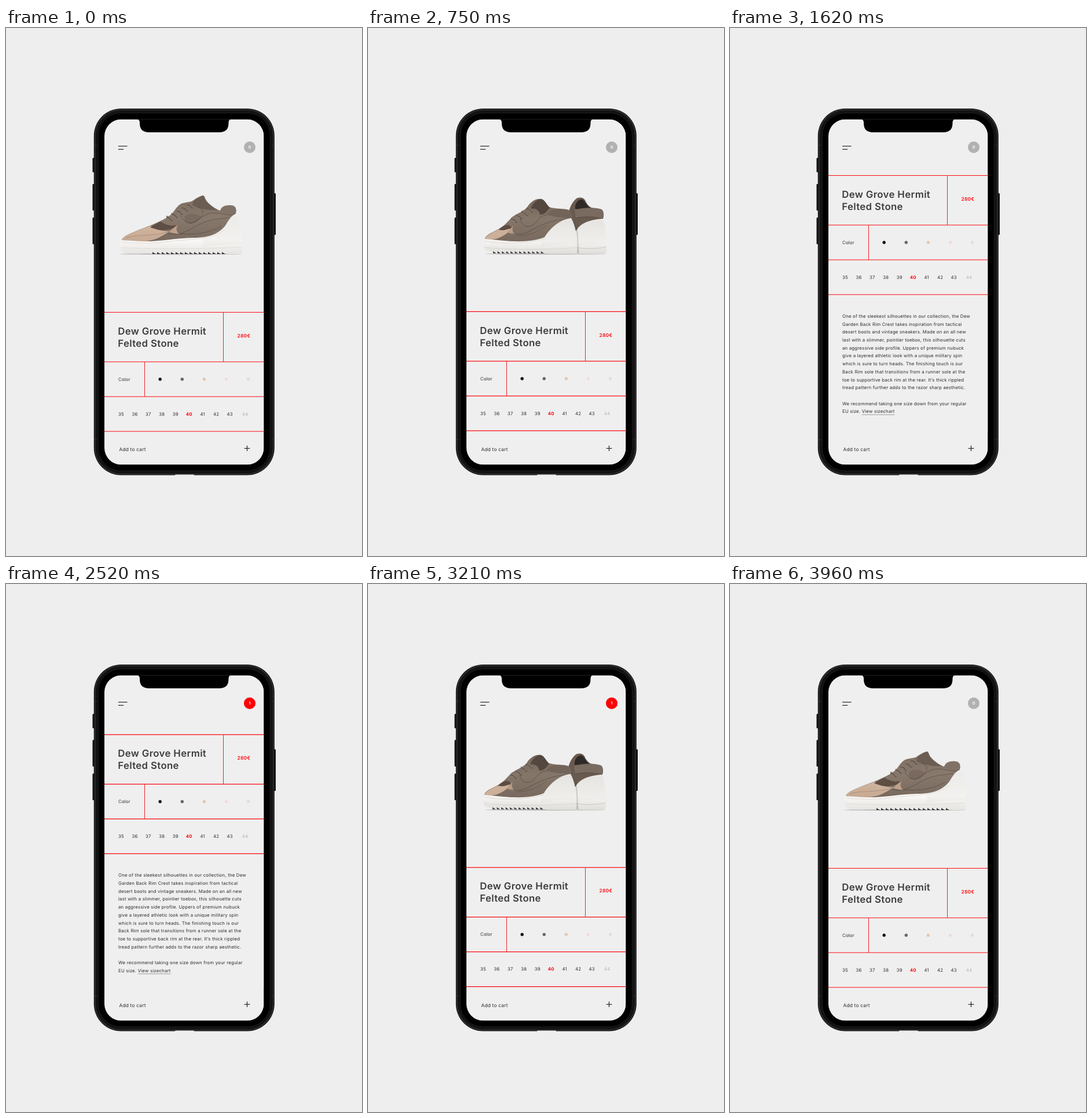
An HTML page with a canvas for the animation above (4560 ms loop, 615 by 911 pixels).

```html
<!DOCTYPE html>
<html lang="en">
<head>
<meta charset="utf-8">
<title>Sneaker shop</title>
<style>
  html, body { margin: 0; width: 100%; height: 100%; overflow: hidden; background: #eee; }
  canvas { display: block; width: 615px; height: 911px; }
</style>
</head>
<body>
<canvas id="stage"></canvas>
<script>
const W = 615, H = 911, LOOP = 4560, MOVE = 800;
const SCREEN = { x: 170, y: 157.5, w: 275.5, h: 596, r: 29 };
const PAPER = '#efefef', INK = '#2d2d2d', RED = '#fb0a10';
const SCROLL = 236, PAGE = 276;
const GALLERY = { x: 307.5, y: 341, lift: 30, shrink: 0.3 };

const canvas = document.getElementById('stage');
const ratio = window.devicePixelRatio || 1;
canvas.width = W * ratio;
canvas.height = H * ratio;
const ctx = canvas.getContext('2d');

const story = [
  'One of the sleekest silhouettes in our collection, the Dew',
  'Garden Back Rim Crest takes inspiration from tactical',
  'desert boots and vintage sneakers. Made on an all new',
  'last with a slimmer, pointier toebox, this silhouette cuts',
  'an aggressive side profile. Uppers of premium nubuck',
  'give a layered athletic look with a unique military spin',
  'which is sure to turn heads. The finishing touch is our',
  'Back Rim sole that transitions from a runner sole at the',
  'toe to supportive back rim at the rear. It\u2019s thick rippled',
  'tread pattern further adds to the razor sharp aesthetic.',
  '',
  'We recommend taking one size down from your regular'
];

// Cubic bezier (.25, .1, .25, 1), solved by bisection
function ease(x) {
  if (x <= 0) return 0;
  if (x >= 1) return 1;
  let lo = 0, hi = 1, s = x;
  for (let i = 0; i < 24; i++) {
    s = (lo + hi) / 2;
    if (0.75 * s * (1 - s) + s ** 3 < x) lo = s; else hi = s;
  }
  return 0.3 * s * (1 - s) ** 2 + 3 * s * s * (1 - s) + s ** 3;
}

const during = (t, start, length = MOVE) => ease((t - start) / length);

function fill(shape, color) {
  ctx.fillStyle = color;
  ctx.fill(typeof shape === 'string' ? new Path2D(shape) : shape);
}

function stroke(shape, color, width = 1) {
  ctx.strokeStyle = color;
  ctx.lineWidth = width;
  ctx.stroke(typeof shape === 'string' ? new Path2D(shape) : shape);
}

function round(x, y, w, h, r) {
  const path = new Path2D();
  path.roundRect(x, y, w, h, r);
  return path;
}

function dot(x, y, r, color) {
  ctx.beginPath();
  ctx.arc(x, y, r, 0, Math.PI * 2);
  ctx.fillStyle = color;
  ctx.fill();
}

function shade(y0, y1, ...colors) {
  const g = ctx.createLinearGradient(0, y0, 0, y1);
  colors.forEach((c, i) => g.addColorStop(i / (colors.length - 1), c));
  return g;
}

function text(str, x, y, { size = 7.8, weight = 400, color = INK, align = 'left', gap = 0.2 } = {}) {
  ctx.font = `${weight} ${size}px Inter, sans-serif`;
  ctx.letterSpacing = gap + 'px';
  ctx.textAlign = align;
  ctx.fillStyle = color;
  ctx.fillText(str, x, y);
  return ctx.measureText(str).width;
}

// Fine horizontal ribs inside a heel cup
function ribs(shape, x0, x1, y0, y1) {
  ctx.save();
  ctx.clip(new Path2D(shape));
  for (let y = y0; y < y1; y += 2.2) {
    stroke(`M${x0} ${y + 5}Q${(x0 + x1) / 2} ${y - 2} ${x1} ${y}`, 'rgba(90,85,80,.1)', 0.7);
  }
  ctx.restore();
}

function tread(x0, x1, step, y) {
  for (let x = x0; x < x1; x += step) {
    fill(`M${x} ${y}l${step * 0.75} 3.4h${-step * 0.75}z`, '#35322f');
  }
}

function laces(x, y, count, dx, dy) {
  for (let i = 0; i < count; i++) {
    const px = x + i * dx, py = y + i * dy;
    stroke(`M${px - 4} ${py - 3}Q${px + 3} ${py - 4} ${px + 6} ${py + 4}`, '#57483f', 3);
    stroke(`M${px - 4} ${py - 3.6}Q${px + 3} ${py - 4.6} ${px + 6} ${py + 3}`, '#94857a', 1.5);
  }
}

function groundShadow(x, rx) {
  ctx.beginPath();
  ctx.ellipse(x, 390, rx, 1.2, 0, 0, Math.PI * 2);
  ctx.fillStyle = 'rgba(60,55,50,.28)';
  ctx.fill();
}

function sideShoe() {
  const sole = 'M199 366C196 372 197 381 200 385L207 389H253V387H378L384 390H405C408 389 408 386 407 380' +
    'C408 360 406 338 398 320C388 324 384 333 378 342C366 356 350 362 322 362C290 363 260 369 235 368Z';
  const stitch = 'rgba(62,49,41,.55)';
  groundShadow(302, 106);
  fill('M200 367C200 362 207 358 216 354C232 347 247 342 258 337C269 332 280 327 287 320' +
    'C293 313 297 304 306 302C313 300 319 301 324 297C329 293 335 290 341 289C344 291 344 295 346 298' +
    'C351 304 361 312 370 315C372 309 377 306 384 306C391 305 396 308 397 313L397 321' +
    'C390 345 360 362 322 364C290 365 260 370 235 369Z', shade(290, 366, '#7c6d62', '#88796d', '#796a5f'));
  fill('M200 367C200 362 207 358 216 354C230 348 240 345 250 341C258 348 268 350 282 351' +
    'C268 360 256 368 236 368Z', shade(342, 368, '#d0b49e', '#c6a992'));
  fill('M249 344C256 339 262 337 267 334C276 340 284 342 296 340C288 348 275 350 262 348Z', '#5f4e43');
  fill('M281 352L297 339C293 346 294 350 299 356Z', '#bda18c');
  fill('M324 299C329 294 336 290 341 289C345 300 354 308 366 314C350 315 334 312 322 306Z', '#6c5d53');
  fill('M370 316C372 305 392 303 396 309C399 315 398 320 394 322C384 322 376 320 370 316Z', '#817267');
  fill('M308 326C314 319 327 319 337 325C331 334 319 339 311 336Z', '#7a6a5f');
  stroke('M207 362C230 355 250 361 279 352', 'rgba(120,93,74,.5)', 0.7);
  stroke('M280 354C300 362 318 346 338 337C355 329 370 330 385 327', stitch, 0.8);
  stroke('M302 323C308 339 326 342 338 325C342 319 340 312 332 309', stitch, 0.8);
  stroke('M317 338C334 332 343 318 362 319C376 320 386 325 396 321', stitch, 0.8);
  stroke('M300 355C328 357 350 354 372 342', stitch, 0.7);
  laces(281, 329, 5, 8.8, -5.5);
  fill(sole, shade(320, 390, '#f1f0ee', '#f4f3f1', '#f8f7f5', '#e6e4e1'));
  ribs(sole, 340, 408, 326, 373);
  stroke('M200 369C215 371 250 373 275 369C310 364 352 367 378 348', '#d8cec5', 0.7);
  stroke('M199 379C260 382 350 381 407 378', 'rgba(110,105,100,.16)', 0.8);
  tread(253, 376, 8, 386.5);
}

function pairShoes() {
  const rear = 'M357 354C362 338 380 331 404 329C409 340 411 355 410 375C411 381 412 385 410 388' +
    'C408 390 404 390 400 390H357Z';
  const front = 'M199 364C198 374 198 380 202 384L215 387H300L310 390H352C360 391 361 386 359 382' +
    'C361 362 358 342 350 328C332 330 314 344 304 361C280 372 240 368 222 366Z';
  const white = shade(328, 390, '#eae8e5', '#efeeeb', '#f4f3f1', '#dfddd9');
  groundShadow(306, 105);

  fill('M345 322C346 312 352 300 358 295C364 291 372 292 375 299C378 306 384 311 392 312' +
    'C402 312 407 317 406 326L402 335L360 350L346 350Z', '#695a50');
  fill('M357 312C356 303 362 295 370 296C375 300 377 308 385 311C375 313 365 314 357 312Z', '#2f2a27');
  fill('M356 314C370 309 398 309 404 314C408 320 406 328 404 330C385 324 368 326 358 328Z', '#7a6b61');
  stroke('M358 328C372 325 390 325 405 329', '#50433b', 0.8);
  fill(rear, white);
  ribs(rear, 350, 412, 334, 372);
  stroke('M358 379Q385 383 411 378', 'rgba(100,95,90,.3)', 0.8);
  fill('M350 330C360 341 362 365 360 389H364C361 370 364 350 357 337Z', 'rgba(75,67,60,.22)');

  fill('M201 363C203 357 215 352 225 347C235 341 240 334 248 326C256 320 266 318 274 309' +
    'C280 300 288 294 298 295C304 296 306 302 312 309C325 313 338 311 346 314C351 318 352 324 350 329' +
    'C330 332 318 350 304 364C270 373 230 370 201 366Z', shade(295, 366, '#75665b', '#85766a', '#796a5f'));
  fill('M280 312C283 303 290 296 298 295C304 297 306 303 313 310C308 316 305 322 296 322' +
    'C294 314 288 310 280 312Z', '#54473f');
  fill('M308 322C312 313 325 311 340 313C350 314 352 322 350 328C335 328 320 326 308 322Z', '#73645a');
  fill('M201 364C204 357 216 352 226 347C233 349 241 345 246 347C238 358 220 368 201 365Z', '#cdb099');
  fill('M224 348C232 341 237 340 242 340L248 345C240 347 234 351 224 348Z', '#5d4b40');
  fill('M239 353L250 341C246 349 250 353 253 357Z', '#b99d87');
  stroke('M247 354C265 363 282 346 300 340C318 331 334 331 349 328', 'rgba(58,46,39,.55)', 0.8);
  stroke('M262 329C264 346 281 347 291 333C299 322 303 325 308 322', 'rgba(58,46,39,.55)', 0.8);
  stroke('M258 359C278 358 294 352 308 340', 'rgba(58,46,39,.4)', 0.7);
  laces(250, 332, 4, 9, -6);
  fill(front, white);
  ribs(front, 298, 360, 332, 372);
  stroke('M200 368C230 373 270 373 304 364', '#d5cbc2', 0.7);
  stroke('M200 379C250 383 310 383 359 379', 'rgba(110,105,100,.18)', 0.8);
  tread(215, 302, 7.5, 385.5);
}

// Shoes slide sideways, and shrink and rise while the panel scrolls over them
function gallery(slide, scroll) {
  const { x, y, lift, shrink } = GALLERY;
  const scale = 1 - shrink * scroll;
  [sideShoe, pairShoes].forEach((shoe, i) => {
    ctx.save();
    ctx.translate(x + (i - slide) * PAGE, y - lift * scroll);
    ctx.scale(scale, scale);
    ctx.translate(-x, -y);
    shoe();
    ctx.restore();
  });
}

function panel(scroll) {
  ctx.save();
  ctx.beginPath();
  ctx.rect(SCREEN.x, SCREEN.y, SCREEN.w, 697 - SCREEN.y);
  ctx.clip();
  ctx.translate(0, -SCROLL * scroll);
  ctx.fillStyle = PAPER;
  ctx.fillRect(SCREEN.x, 490.5, SCREEN.w, 500);

  for (const y of [490.5, 576, 636, 696]) stroke(`M170 ${y}H446`, RED, 1.2);
  stroke('M375.5 490.5V576M239.5 576V636', '#ef2226', 1);

  const title = { size: 16.8, weight: 600, color: '#3d3d3d', gap: 0.35 };
  text('Dew Grove Hermit', 193.3, 528.8, title);
  text('Felted Stone', 193.3, 549.8, title);
  text('280€', 399.5, 533.6, { size: 8.4, weight: 600, color: RED });

  text('Color', 194, 608.8);
  ['#111113', '#66666b', '#e3c8b3', '#f3dadd', '#e1dedf']
    .forEach((c, i) => dot(266.2 + i * 38.1, 606, 2.7, c));

  for (let i = 0; i < 10; i++) {
    const chosen = i === 5, soldOut = i === 9;
    text(String(35 + i), 199 + i * 23.45 + (soldOut ? 3 : 0), 668.8, {
      align: 'center',
      weight: chosen ? 700 : 400,
      color: chosen ? RED : soldOut ? '#b2b2b2' : INK
    });
  }

  const top = 735.9, leading = 13.7;
  story.forEach((line, i) => text(line, 194, top + i * leading));
  const last = top + story.length * leading;
  const linkX = 194 + text('EU size. ', 194, last);
  const linkW = text('View sizechart', linkX, last);
  stroke(`M${linkX} ${last + 2.9}h${linkW}`, '#777', 0.7);
  ctx.restore();
}

function fixedBars(added) {
  stroke('M194 203.8H209.5M194 209.3H203.2', INK, 1.3);

  dot(421, 205.8, 10, '#b1b1b1');
  ctx.globalAlpha = added;
  dot(421, 205.8, 10, '#ff0006');
  const digit = { size: 7, weight: 600, color: '#fff', align: 'center', gap: 0 };
  ctx.globalAlpha = 1 - added;
  text('0', 421, 208.4, digit);
  ctx.globalAlpha = added;
  text('1', 421, 208.4, digit);
  ctx.globalAlpha = 1;

  text('Add to cart', 195.4, 729.9, { size: 8.4 });
  stroke('M411.7 725.3H421.3M416.5 720.5V730.1', INK, 1.3);
}

function phone() {
  for (const [y, h] of [[224, 25], [269, 46], [327, 46]]) fill(round(149.5, y, 5, h, 1.5), '#141414');
  fill(round(461, 285, 5, 72, 1.5), '#141414');
  fill(round(151.8, 139, 312, 632.5, 47), '#0d0d0d');
  stroke(round(153.8, 141, 308, 628.5, 45), '#2d2e2e', 2);
  stroke(round(156.5, 143.8, 302.6, 623, 42), '#151515', 2);
  stroke(round(159.2, 146.5, 297.2, 617.6, 39), '#272727', 0.8);
  fill(round(160, 147.3, 295.6, 616, 38), '#000');
  stroke('M152 202.5H157M459 202.5H464M152 710.5H157M459 710.5H464', '#303030', 1.5);
  fill(round(292, 770.4, 33, 2, 1), '#eee');
}

function draw(t) {
  const playing = t < 3960;
  const slide = playing ? during(t, 18) - during(t, 3212) : 0;
  const scroll = during(t, 743) - during(t, 2490);
  const added = during(t, 1635, 360) - during(t, 3420, 360);

  ctx.setTransform(ratio, 0, 0, ratio, 0, 0);
  ctx.textRendering = 'geometricPrecision';
  ctx.lineCap = 'butt';
  ctx.fillStyle = '#eee';
  ctx.fillRect(0, 0, W, H);
  phone();

  ctx.save();
  const { x, y, w, h, r } = SCREEN;
  ctx.clip(round(x, y, w, h, r));
  ctx.fillStyle = PAPER;
  ctx.fillRect(x, y, w, h);
  gallery(slide, scroll);
  panel(scroll);
  fixedBars(added);
  fill('M225 157H390Q384.5 157.5 384.5 163V164C384.5 175 379 180 368 180H247.5C236.5 180 231 175 231 164V163Q231 157.5 225 157Z', '#000');
  ctx.restore();
}

const start = performance.now();
function tick(now) {
  draw(Math.max(0, now - start) % LOOP);
  requestAnimationFrame(tick);
}
draw(0);
requestAnimationFrame(tick);
</script>
</body>
</html>
```
